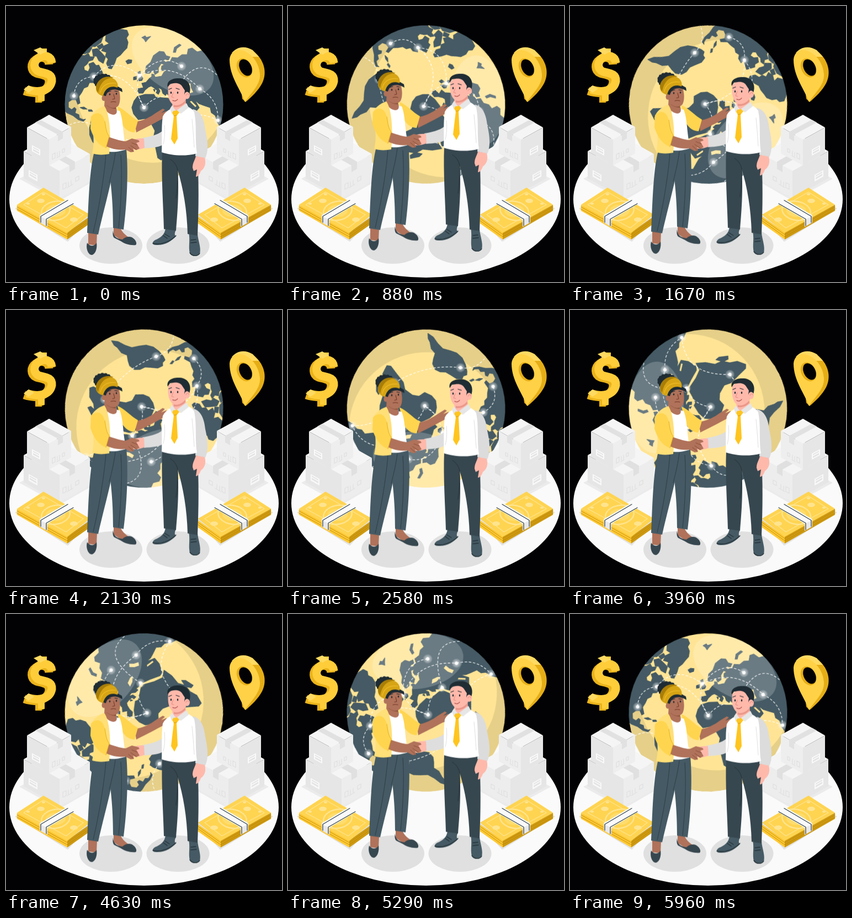
These frames come from a looping animation (500x500 px, 6000 ms). An HTML page:

```html
<!DOCTYPE html>
<html lang="en">
<head>
<meta charset="utf-8">
<title>Global deal</title>
<style>
  html, body { margin: 0; width: 100%; height: 100%; overflow: hidden; background: #020204; }
  svg { display: block; width: 100vw; height: 100vh; }
  #globe { transform-origin: 250px 178.5px; }
  .land { fill: #455a64; stroke: #455a64; stroke-width: 1.2; stroke-linejoin: round; }
  .sea { fill: #ffe495; }
  .arc { fill: none; stroke: #fff; stroke-width: 1.1; stroke-dasharray: 4.5 3; }
  .skinA { fill: #b0725a; }
  .skinB { fill: #ffb9ab; }
  .hair { fill: #1f2c33; }
  .line { fill: none; stroke-linecap: round; stroke-linejoin: round; }
  .coin { fill: none; stroke-linecap: butt; }
  .left { --long: #ffc933; --short: #cf9a10; }
  .right { --long: #cf9a10; --short: #ffc933; }
  .long { fill: var(--long); }
  .short { fill: var(--short); }
</style>
</head>
<body>
<svg viewBox="0 0 500 500" xmlns="http://www.w3.org/2000/svg">
  <defs>
    <clipPath id="disc"><circle cx="250" cy="178.5" r="143.5"/></clipPath>
    <radialGradient id="glow">
      <stop offset="0" stop-color="#fff"/>
      <stop offset=".32" stop-color="#fff" stop-opacity=".95"/>
      <stop offset=".42" stop-color="#fff" stop-opacity=".5"/>
      <stop offset="1" stop-color="#fff" stop-opacity=".08"/>
    </radialGradient>
    <g id="dollar">
      <path d="M83 103C82 91 70 87 59 94C49 101 49 114 60 119C71 122 84 122 83 136C80 152 62 159 38 151" stroke-width="15"/>
      <path d="M68 77V92M64 152V172" stroke-width="12"/>
    </g>
    <g id="stack">
      <path fill="#ebebeb" d="M24 313L88 279 161 316 97 353Z"/>
      <path fill="#f5f5f5" d="M32 263L88 232 152 268 97 299Z"/>
      <path fill="#e6e6e6" d="M32 263L97 299V348L32 312Z"/>
      <path fill="#ededed" d="M97 299L152 268V318L97 348Z"/>
      <path fill="#e0e0e0" d="M50 252L62 246 125 282V295L115 301V289Z"/>
      <path fill="#f8f8f8" d="M41 297L57 306V318L41 309Z"/>
      <path fill="#e4e4e4" d="M43 300l12 7v2l-12-7ZM43 304l12 7v3l-12-7Z"/>
      <path class="line" stroke="#e0e0e0" stroke-width="1.3" d="M103 332V323L109 320V329ZM113 326V319M118 323V316M111 329L121 323M126 318V311L132 308V315Z"/>
      <path fill="#f5f5f5" d="M38 220L78 197 118 219 78 242Z"/>
      <path fill="#e6e6e6" d="M38 220L78 242V289L38 266Z"/>
      <path fill="#eee" d="M78 242L118 219V267L78 289Z"/>
      <path fill="#e1e1e1" d="M53 211L62 206 103 228V240L94 245V233Z"/>
      <path fill="#fafafa" d="M47 252L62 260V271L47 263Z"/>
      <path fill="#e4e4e4" d="M49 255l11 6v2l-11-6ZM49 259l11 6v3l-11-6Z"/>
      <path class="line" stroke="#e0e0e0" stroke-width="1.2" d="M84 278V269L89 266V275ZM93 272V265M97 270V263M92 275L98 271M102 266V260L106 258V264Z"/>

      <path fill="#e3e3e3" d="M16 367L69 332 155 379 112 427Z"/>
      <path class="long" d="M20 360L111 410V423L20 371Z"/>
      <path class="short" d="M111 410L152 381V394L111 423Z"/>
      <path class="line" stroke="#b9860a" stroke-width=".8" d="M20 364L111 414 152 385M20 368L111 418 152 389"/>
      <path fill="#ffd451" d="M20 360L68 329 152 378 111 411Z"/>
      <path class="line" stroke="#ffe48f" stroke-width="1.4" d="M32 360L68 337 140 378 109 402Z"/>
      <g fill="#ffe48f">
        <ellipse cx="63" cy="353" rx="7" ry="4"/><ellipse cx="123" cy="387" rx="7" ry="4"/>
        <ellipse cx="40" cy="358" rx="3" ry="2"/><ellipse cx="68" cy="341" rx="3" ry="2"/>
      </g>
      <ellipse cx="90" cy="371" rx="26" ry="17" transform="rotate(-10 90 371)" fill="none" stroke="#ffe48f" stroke-width="2.5"/>
      <ellipse cx="90" cy="371" rx="18" ry="11" fill="#ffdc6c"/>
      <path fill="#fafafa" d="M61 379L110 350 124 358 75 387V400L61 392Z"/>
      <path fill="#e8e8e8" d="M61 380L75 388V400L61 392Z"/>
      <path class="line" stroke="#37474f" stroke-width="1.3" d="M63 392V381L112 352M73 398V386L122 358"/>
    </g>
  </defs>

  <ellipse cx="250" cy="350" rx="244" ry="142" fill="#fafafa"/>

  <g id="globe"><g clip-path="url(#disc)">
    <circle cx="250" cy="178.5" r="143.5" fill="#e6cf88"/>
    <circle class="sea" cx="266" cy="144" r="140"/>
    <g class="land">
      <!-- Greenland, Iceland, northern islands -->
      <path d="M181 53L195 45 208 42 219 44 222 52 218 58 221 66 219 76 213 82 207 89 200 94 197 103 191 114 186 113 182 104 185 96 180 91 182 84 173 81 178 72 187 68 180 63Z"/>
      <path d="M217 100L222 97 228 98 227 103 220 105Z"/>
      <path d="M246 57L252 54 254 57 262 55 257 60 253 65 250 60Z"/>
      <path d="M303 84L305 75 314 69 317 71 309 77 307 84Z"/>
      <!-- North America -->
      <path d="M100 185L104 130 118 100 132 88 142 90 149 86 152 92 160 92 157 98 150 100 147 105 141 110 142 116 149 119 152 112 150 105 158 102 163 108 168 107 172 115 175 121 166 126 159 129 165 133 158 139 151 139 148 146 141 149 137 157 132 164 134 176 130 178 127 170 119 170 113 174 113 184 119 188 124 184 127 187 125 194 132 197 133 203 140 206 144 205 140 209 131 206 122 199 111 194Z"/>
      <path d="M136 86L146 74 156 75 151 84 142 87ZM151 73L162 61 176 55 172 66 161 74ZM156 79L165 77 173 85 180 93 176 104 168 99 164 91 158 91ZM165 73L174 68 177 74 169 79Z"/>
      <path d="M134 184L141 183 147 187 140 187ZM149 188L155 188 157 191 150 191Z"/>
      <!-- Africa, Madagascar -->
      <path d="M232 172L238 164 252 160 268 160 271 165 282 166 292 167 300 171 308 189 317 203 331 204 323 219 311 232 309 246 299 256 294 269 281 279 275 275 271 256 267 239 270 226 262 211 252 204 240 206 231 195 228 184Z"/>
      <path d="M317 238L318 245 311 260 306 257 307 247Z"/>
      <!-- Eurasia -->
      <path d="M252 122L254 109 262 102 267 90 278 82 286 83 290 90 297 92 294 98 286 96 288 102 298 99 301 93 311 94 319 88 328 88 330 78 337 76 346 83 358 80 405 90 405 230 388 218 383 211 379 198 372 193 370 184 358 180 350 177 342 170 347 179 350 184 341 194 326 201 320 198 311 181 304 170 306 163 297 164 291 158 289 162 284 158 282 151 275 147 279 154 276 160 272 157 274 153 268 148 263 145 258 147 252 152 248 158 240 158 238 150 249 148 246 140 254 138 260 131 264 128 264 123 268 124 270 129 282 127 286 120 291 117 281 117 282 109 287 106 281 104 276 112 276 120 270 124 266 116 260 122Z"/>
      <path d="M239 120L243 118 244 125 248 131 246 135 238 136 242 130ZM231 129L237 127 236 133 231 134ZM267 151l2 4 1-4ZM289 167h6l-2 2Z"/>
      <!-- South America -->
      <g transform="rotate(-100.2 250 178.5)">
        <path d="M141 97L152 93 166 93 179 91 190 82 200 75 213 72 226 74 238 79 243 83 241 89 244 94 238 102 226 107 217 111 211 119 202 124 191 122 184 115 178 107 167 108 156 103 149 102Z"/>
      </g>
    </g>
    <path class="sea" d="M293 147L299 142 309 145 313 149 302 150ZM328 141L334 140 335 148 339 156 333 158 329 150ZM333 173L336 172 345 181 343 183Z"/>
    <ellipse cx="302" cy="100" rx="83" ry="50" transform="rotate(34 302 100)" fill="#fff" opacity=".2"/>
    <g id="routes"></g>
  </g></g>

  <!-- Dollar and pin -->
  <g class="coin" stroke="#eab31a">
    <use href="#dollar" x="-5" y="3"/>
    <use href="#dollar" x="-2" y="1"/>
  </g>
  <use class="coin" href="#dollar" stroke="#ffcd3a"/>
  <path fill="#ffda62" d="M50 80L62 75 74 82 62 88ZM32 151L41 144 51 150 41 157Z"/>
  <path fill="#e5ae17" d="M417 79C428 72 443 75 455 88C470 104 472 124 464 140C457 153 446 164 434 174L428 168Z"/>
  <path fill="#ffda62" d="M409 85C418 74 432 71 447 80L458 92 440 92Z"/>
  <path fill="#ffd146" d="M405 97C406 84 416 77 430 81C447 87 459 105 460 124C461 143 444 157 433 174C425 151 405 128 405 97Z"/>
  <ellipse cx="432" cy="112" rx="13" ry="18" transform="rotate(-27 432 112)" fill="#e5ae17"/>
  <ellipse cx="434" cy="111.500" rx="10.500" ry="16" transform="rotate(-27 434 111.500)" fill="#020204"/>

  <!-- Boxes and banknotes -->
  <use class="left" href="#stack"/>
  <use class="right" href="#stack" transform="matrix(-1 0 0 1 500 0)"/>

  <g fill="#e0e0e0">
    <ellipse cx="190" cy="434" rx="57" ry="33"/><ellipse cx="311.500" cy="434" rx="57" ry="33"/>
  </g>

  <g id="people">
    <!-- Woman: legs -->
    <path class="skinA" d="M149 408L165 412 164 434 149 432ZM195 400L207 402C211 411 218 416 225 421L211 426 195 415Z"/>
    <path fill="#37474f" d="M147 429C152 436 160 436 164 429C166 440 161 451 155 451C149 451 144 439 147 429ZM194 407C194 417 201 422 211 423C216 418 223 417 228 419C235 423 238 430 235 433C225 434 215 431 208 426L196 420C193 417 193 411 194 407Z"/>
    <path fill="#455a64" d="M174 262L218 259C222 300 219 360 213 405L194 402C194 360 191 330 187 298Z"/>
    <path fill="#455a64" d="M160 264L198 264C197 300 183 345 167 414L147 411C149 375 150 300 160 264Z"/>
    <path class="line" stroke="#2f3f48" stroke-width="1" d="M181 268C179 300 170 360 158 410M198 266C196 283 192 300 187 320M208 270C211 310 208 360 204 402"/>
    <!-- Woman: far arm and torso -->
    <path class="skinA" d="M233 210C248 208 262 201 271 194L284 186 288 188 281 194 291 190 290 195 286 203C273 210 256 219 236 229Z"/>
    <path fill="#ffd54f" d="M202 182C216 188 225 200 239 208L233 229C224 229 216 224 210 214Z"/>
    <path fill="#fff" d="M183 186L206 190C214 210 211 240 219 259C211 263 198 265 187 264Z"/>
    <path class="skinA" d="M179 166L198 172 200 186C202 193 200 197 194 197C186 196 179 189 178 182Z"/>
    <path fill="#8b513b" d="M182 180C188 185 195 187 199 186L198 181Z"/>
    <path fill="#ffdf77" d="M153 205C156 192 167 185 178 181C187 193 191 228 187 268C177 270 165 270 156 267C160 252 160 232 153 205Z"/>
    <!-- Man: legs -->
    <path fill="#455a64" d="M289 402L308 405C305 412 305 415 308 417C300 426 288 434 272 433C264 433 264 428 270 424C280 420 288 414 289 402ZM331 410L347 413C348 425 354 438 351 449C347 455 336 454 333 448C330 436 334 425 331 410Z"/>
    <path class="line" stroke="#263238" stroke-width="1.3" d="M266 430C283 434 299 425 308 416M333 447C338 454 347 454 351 448M288 413L296 418M285 416L292 421M335 424L344 423M335 429L345 428"/>
    <path fill="#37474f" d="M283 262L346 265C350 315 349 370 347 416L329 413C328 370 321 330 311 297C314 340 310 380 308 407L286 404C285 360 281 310 283 262Z"/>
    <path class="line" stroke="#263238" stroke-width="1" d="M311 297C309 287 303 281 298 278M311 297C311 315 310 333 308 348"/>
    <!-- Man: torso -->
    <path fill="#dcdcdc" d="M338 187C352 189 359 204 361 224C366 246 367 263 361 276L343 272C345 250 341 225 337 205Z"/>
    <path class="skinB" d="M344 272L360 275C363 286 360 294 353 299C351 305 347 310 344 309L346 296 340 299 338 293C338 284 342 280 344 272Z"/>
    <path fill="#dedede" d="M284 226C274 234 260 237 247 239L250 258C265 257 279 256 288 249Z"/>
    <path fill="#fff" d="M284 200C290 188 304 183 316 180C327 180 336 184 341 192C346 216 342 245 346 267C324 273 300 271 282 265C283 245 281 220 284 200Z"/>
    <path class="line" stroke="#e0e0e0" stroke-width="1" d="M287 216C288 226 288 238 285 250M337 205C339 225 340 240 341 256"/>
    <path class="skinB" d="M302 170L325 164 326 180 309 191 301 183Z"/>
    <path fill="#e99688" d="M304 179C313 181 320 176 324 170L325 175C319 182 311 184 304 183Z"/>
    <path fill="#e6e6e6" d="M301 180L307 190 300 195 297 186ZM327 176L331 184 317 195 308 190Z"/>
    <path fill="#ffc51f" d="M303 190L310 189 314 193 309 199 311 240 305 251 299 241 304 199 301 194Z"/>
    <path class="line" stroke="#d99b00" stroke-width=".9" d="M304 199L309 198"/>
    <!-- Handshake -->
    <path class="skinB" d="M250 240C239 239 227 242 219 248L223 258C233 263 243 260 251 257Z"/>
    <path class="skinA" d="M178 235C193 239 207 245 217 245L228 240 240 243 242 246 236 248 238 251 242 258 236 261 230 258 232 264 226 265 216 260C202 262 187 258 174 250Z"/>
    <path class="line" stroke="#81452f" stroke-width=".8" d="M228 248L238 252M226 253L236 260M222 256L230 263"/>
    <path fill="#ffd54f" d="M154 200C165 190 174 194 178 206C182 218 181 228 187 236L181 257C168 253 158 239 153 222Z"/>
    <path class="line" stroke="#e5ae17" stroke-width=".9" d="M179 209C181 222 182 230 187 236L181 257"/>

    <!-- Woman: head -->
    <g class="hair" id="curls"></g>
    <path class="skinA" d="M177 153C182 143 198 142 204 150C207 159 208 172 204 180C200 186 190 186 184 181C178 176 175 163 177 153Z"/>
    <path class="hair" d="M174 163C176 147 190 142 203 146L210 150 211 156 205 153C194 149 184 152 181 163Z"/>
    <ellipse class="skinA" cx="177" cy="167" rx="3.500" ry="5"/>
    <path fill="#d6a414" d="M163 151C162 136 177 127 191 130C201 133 204 142 202 148C190 143 179 149 176 163C168 161 164 157 163 151Z"/>
    <path fill="#a97e08" d="M163 146C166 132 181 124 195 130C181 130 171 137 167 157C164 154 163 150 163 146Z"/>
    <path class="line" stroke="#f0bd2d" stroke-width="1.2" d="M171 157C173 145 183 138 199 140"/>
    <g class="hair"><ellipse cx="188" cy="160" rx="1.300" ry="1.800"/><ellipse cx="200" cy="159" rx="1.300" ry="1.800"/></g>
    <path class="line" stroke="#1f2c33" stroke-width="1.1" d="M184 156L190 154M197 154L202 155"/>
    <path class="line" stroke="#6e3423" stroke-width="1" d="M195 160L197 168 193 169M190 174C193 173 196 173 199 174"/>

    <!-- Man: head -->
    <path class="skinB" d="M294 146C300 136 319 137 326 148L329 163C325 174 316 180 308 180C296 179 292 163 294 146Z"/>
    <path class="hair" d="M293 147C290 136 301 130 315 131C331 132 338 147 331 162L326 168 323 160 324 153 320 147C317 141 311 139 304 140L297 141Z"/>
    <ellipse class="skinB" cx="328" cy="162" rx="5" ry="6.500"/>
    <path class="line" stroke="#e58b7d" stroke-width="1" d="M326 162C327 158 331 158 331 161M303 157L300 165 304 166"/>
    <g class="hair"><ellipse cx="299" cy="157" rx="1.300" ry="1.900"/><ellipse cx="311" cy="157" rx="1.300" ry="1.900"/></g>
    <path class="line" stroke="#1f2c33" stroke-width="1.300" d="M295 151L300 149M308 149L314 151"/>
    <path class="line" stroke="#9d3f3a" stroke-width="1.100" d="M302 171C305 173 309 172 311 169"/>
  </g>
</svg>
<script>
  const NS = "http://www.w3.org/2000/svg";
  const byId = id => document.getElementById(id);
  function add(parent, tag, attrs) {
    const el = document.createElementNS(NS, tag);
    for (const key in attrs) el.setAttribute(key, attrs[key]);
    parent.append(el);
  }

  const spots = {
    usa: [123, 163], canada: [159, 128], britain: [242, 126],
    sahara: [250, 184], egypt: [302, 165], russia: [318, 109],
    asia: [351, 150], india: [384, 207], south: [281, 245], brazil: [162, 219]
  };
  // start, control point, end
  const routes = [
    ["usa", [126, 130], "canada"],
    ["canada", [194, 88], "britain"],
    ["canada", [220, 112], "sahara"],
    ["britain", [280, 82], "russia"],
    ["britain", [302, 98], "asia"],
    ["britain", [232, 157], "sahara"],
    ["sahara", [272, 158], "egypt"],
    ["egypt", [345, 75], [393, 137]],
    ["asia", [385, 168], "india"],
    ["india", [322, 175], "south"],
    ["brazil", [215, 252], "south"],
    ["brazil", [135, 200], [105, 222]]
  ];
  const at = p => spots[p] || p;
  const layer = byId("routes");
  for (const [from, bend, to] of routes)
    add(layer, "path", { class: "arc", d: `M${at(from)}Q${bend} ${at(to)}` });
  for (const [cx, cy] of Object.values(spots))
    add(layer, "circle", { cx, cy, r: 8.5, fill: "url(#glow)" });

  // Ring of curls around the bun
  const curls = byId("curls");
  for (let i = 0; i < 15; i++) {
    const a = i / 15 * Math.PI * 2;
    add(curls, "circle", { cx: 176 + 14 * Math.cos(a), cy: 136 + 10 * Math.sin(a), r: 3.8 });
  }
  add(curls, "ellipse", { cx: 176, cy: 136, rx: 14, ry: 11 });

  byId("globe").animate(
    { transform: ["rotate(0deg)", "rotate(360deg)"] },
    { duration: 6000, iterations: Infinity }
  );
  byId("people").animate(
    { transform: ["translateY(0px)", "translateY(-10px)", "translateY(0px)"] },
    { duration: 1500, iterations: Infinity }
  );
</script>
</body>
</html>
```
